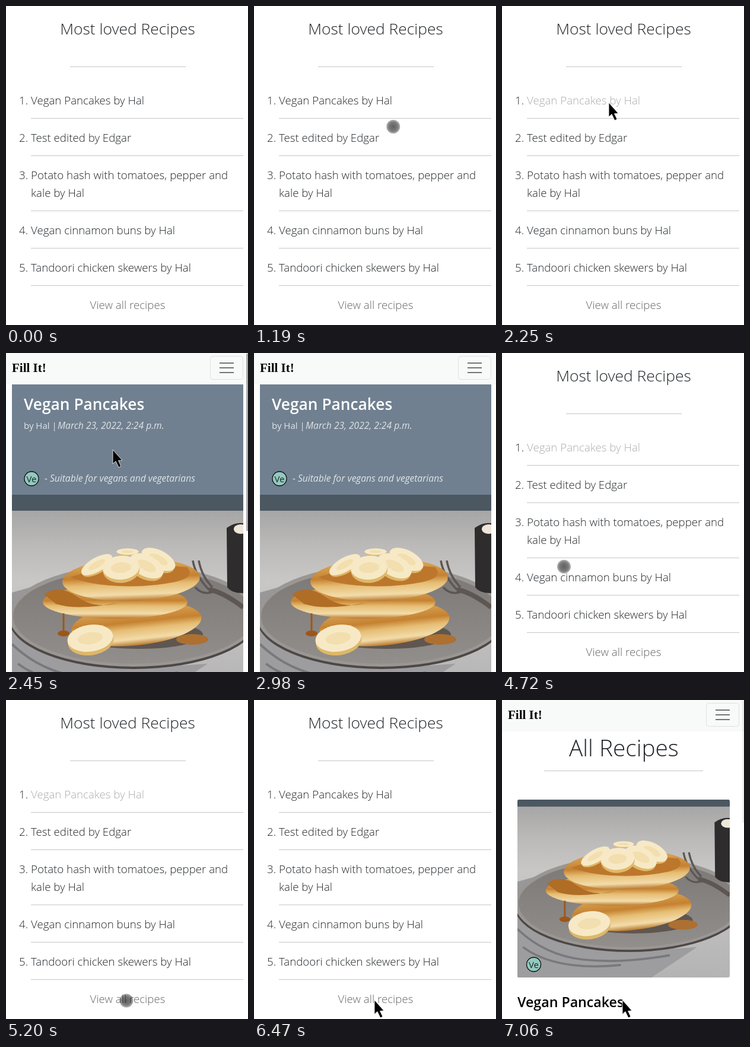
Recreate the animation shown at these times as an HTML page. Size 408 by 538 pixels, loop 7920 ms.

```html
<!DOCTYPE html>
<html lang="en">
<head>
<meta charset="utf-8">
<title>Recipe list</title>
<style>
  html, body { margin: 0; height: 100%; overflow: hidden; background: #fff; }
  svg { display: block; width: 100vw; height: 100vh; }
  text { font: 300 18.7px "Open Sans", "Noto Sans", sans-serif; fill: #212529; }
  .mid { text-anchor: middle; }
  text.head { font-size: 26.4px; }
  text.title { font-size: 38.8px; }
  text.name { font-size: 26.3px; font-weight: 600; fill: #fff; }
  text.card { font-size: 23.2px; font-weight: 600; fill: #000; }
  text.small { font-size: 15px; font-weight: 400; }
  text.pale { fill: #e0e3e6; }
  text.italic { font-size: 15.65px; font-style: italic; }
  text.brand { font: bold 21px "Liberation Serif", serif; fill: #000; }
  .rule { stroke: #c6c6c6; fill: none; }
</style>
</head>
<body>
<svg viewBox="0 0 408 538">
  <defs>
    <linearGradient id="table" x2="0" y2="1">
      <stop offset=".08" stop-color="#a7a6a6"/>
      <stop offset=".25" stop-color="#bbbab9"/>
      <stop offset=".42" stop-color="#c9c7c6"/>
      <stop offset="1" stop-color="#b4b3b4"/>
    </linearGradient>
    <linearGradient id="plate" x2="0" y2="1">
      <stop offset="0" stop-color="#7c7876"/>
      <stop offset="1" stop-color="#928e8b"/>
    </linearGradient>
    <linearGradient id="cake" x2="0" y2="1">
      <stop offset="0" stop-color="#e0b062"/>
      <stop offset=".45" stop-color="#c58231"/>
      <stop offset=".62" stop-color="#e6bd74"/>
      <stop offset=".85" stop-color="#f2dcaa"/>
      <stop offset="1" stop-color="#b9772c"/>
    </linearGradient>
    <radialGradient id="touch">
      <stop offset="0" stop-opacity=".62"/>
      <stop offset=".65" stop-opacity=".52"/>
      <stop offset="1" stop-opacity=".3"/>
    </radialGradient>
    <clipPath id="cardClip"><rect x="26" y="168" width="358" height="300" rx="3"/></clipPath>
    <clipPath id="heroClip"><rect x="10" y="239" width="390" height="299"/></clipPath>

    <g id="slice">
      <ellipse rx="31" ry="19" cy="4" fill="#deb868"/>
      <ellipse rx="31" ry="18" fill="#f7e9c6"/>
      <ellipse rx="17" ry="8" fill="#f2deae"/>
    </g>

    <g id="photo">
      <rect width="390" height="345" fill="url(#table)"/>
      <rect width="390" height="27" fill="#4b5761"/>
      <path d="M0 165L60 148 40 345H0z" fill="#98979a"/>
      <path d="M0 215Q60 290 200 294L330 285 240 345H0z" fill="#9d9c9f"/>
      <path d="M0 252Q50 300 120 308T280 300M10 285Q70 330 190 318" fill="none" stroke="#79787d" stroke-width="4"/>
      <ellipse cx="205" cy="208" rx="211" ry="86" fill="#4d4846"/>
      <ellipse cx="205" cy="204" rx="210" ry="86" fill="#9a9693"/>
      <ellipse cx="205" cy="205" rx="203" ry="80" fill="url(#plate)"/>
      <path d="M362 56Q376 46 390 48V166Q370 166 363 156Z" fill="#2f2c2d"/>
      <ellipse cx="386" cy="58" rx="12" ry="8" fill="#eee6da"/>
      <g fill="none" stroke="#5d5652" stroke-width="3.5">
        <path d="M305 111Q309 136 332 160M315 111Q320 138 338 156M309 156Q322 171 342 163"/>
        <path d="M332 160Q356 164 390 190" stroke-width="8"/>
      </g>
      <ellipse cx="214" cy="236" rx="108" ry="24" fill="#5f5650"/>
      <ellipse cx="304" cy="244" rx="27" ry="9" fill="#ad7030"/>
      <ellipse cx="210" cy="218" rx="110" ry="36" transform="rotate(-6 210 218)" fill="url(#cake)"/>
      <ellipse cx="174" cy="181" rx="122" ry="28" fill="url(#cake)"/>
      <path d="M54 168Q80 150 110 172T180 182Q110 196 74 184z" fill="#b06d26"/>
      <ellipse cx="201" cy="143" rx="116" ry="36" transform="rotate(-2 201 143)" fill="url(#cake)"/>
      <path d="M98 139Q180 112 295 122 312 140 270 148T180 154 98 139z" fill="#bd772d"/>
      <path d="M87 200V230" stroke="#9c5719" stroke-width="3"/>
      <ellipse cx="87" cy="234" rx="10" ry="5" fill="#9c5719"/>
      <use href="#slice" transform="translate(195 96)scale(.6 .3)"/>
      <use href="#slice" transform="translate(143 118)rotate(-30)scale(.95 .65)"/>
      <use href="#slice" transform="translate(247 109)rotate(27)scale(1 .85)"/>
      <use href="#slice" transform="translate(227 120)rotate(27)"/>
      <use href="#slice" transform="translate(184 123)rotate(-5)scale(1 1.12)"/>
      <use href="#slice" transform="translate(132 242)rotate(-8)scale(1.25)"/>
    </g>

    <g id="navbar">
      <rect width="408" height="53" fill="#f8f9f9"/>
      <text class="brand" x="10" y="32">Fill It!</text>
      <rect x="344.5" y="5.5" width="55" height="39" rx="4" fill="none" stroke="#dfe0e0"/>
      <path d="M360 17h24M360 25h24M360 33h24" stroke="#737474" stroke-width="2"/>
    </g>

    <g id="badge">
      <circle r="12" fill="#92cabf" stroke="#111" stroke-width="1.3"/>
      <text class="small mid" y="5.5">Ve</text>
    </g>
  </defs>

  <g id="list">
    <text class="head mid" x="205" y="48">Most loved Recipes</text>
    <path class="rule" d="M108 102.5H303M42 189.5H400M42 252.5H400M42 345.5H400M42 408.5H400M42 471.5H400"/>
    <text x="22" y="166">1.</text><text id="first" x="42" y="166">Vegan Pancakes by Hal</text>
    <text x="22" y="229">2.</text><text x="42" y="229">Test edited by Edgar</text>
    <text x="22" y="292">3.</text><text x="42" y="292">Potato hash with tomatoes, pepper and</text>
    <text x="42" y="322">kale by Hal</text>
    <text x="22" y="385">4.</text><text x="42" y="385">Vegan cinnamon buns by Hal</text>
    <text x="22" y="448">5.</text><text x="42" y="448">Tandoori chicken skewers by Hal</text>
    <text class="mid" x="205" y="511" style="fill:#666">View all recipes</text>
  </g>

  <g id="recipe">
    <use href="#navbar"/>
    <rect x="10" y="53" width="390" height="186" fill="#708090"/>
    <text class="name" x="30" y="96">Vegan Pancakes</text>
    <text class="small pale" x="30" y="128">by Hal |</text>
    <text class="small pale italic" x="87" y="128">March 23, 2022, 2:24 p.m.</text>
    <use href="#badge" x="43" y="212"/>
    <text class="small pale italic" x="65" y="217">- Suitable for vegans and vegetarians</text>
    <g clip-path="url(#heroClip)"><use href="#photo" x="10" y="239"/></g>
  </g>

  <g id="all">
    <use href="#navbar"/>
    <text class="title mid" x="205.5" y="95">All Recipes</text>
    <path class="rule" d="M71 119.5H339"/>
    <g clip-path="url(#cardClip)"><use href="#photo" transform="translate(26 155)scale(.918)"/></g>
    <use href="#badge" x="53.5" y="446"/>
    <text class="card" x="26" y="518">Vegan Pancakes</text>
    <text class="small" x="26" y="548.5">by Hal</text>
  </g>

  <rect id="bar" x="405" y="1" width="3" fill="#777"/>
  <circle id="dot" r="11.5" fill="url(#touch)"/>
  <path id="arrow" d="M0 0V24L5 19.5 10 30 14 28 9.5 18.5 16 18Z" stroke="#fff" stroke-width=".8"/>
</svg>
<script>
const LOOP = 7920;
const el = id => document.getElementById(id);
const show = (id, on) => el(id).setAttribute("visibility", on ? "visible" : "hidden");
const moveTo = (id, [x, y]) => el(id).setAttribute("transform", `translate(${x} ${y})`);
const within = (t, a, b) => t >= a && t < b;

// Number of steps taken: 1 at time a, n at time b
const tick = (t, a, b, n) =>
  Math.max(0, Math.min(n, Math.floor((t - a) / (b - a) * (n - 1) + 1 + 1e-6)));

// Decelerating move along a quadratic curve, in n discrete steps
function glide(t, a, b, n, from, bend, to) {
  const rest = 1 - (tick(t, a, b, n) - 1) / (n - 1);
  const u = 1 - rest * rest, v = 1 - u;
  return from.map((p, i) => v * v * p + 2 * u * v * bend[i] + u * u * to[i]);
}

function draw(t) {
  const onRecipe = within(t, 2450, 3980), onAll = t >= 6530;
  show("list", !onRecipe && !onAll);
  show("recipe", onRecipe);
  show("all", onAll);

  const dim = tick(t, 1790, 1920, 2) / 2 - tick(t, 5730, 5860, 2) / 2;
  el("first").setAttribute("opacity", 1 - 0.62 * dim);

  show("dot", within(t, 860, 2250) || within(t, 4580, 6470));
  moveTo("dot", t < 4000
    ? glide(t, 860, 1520, 11, [396, 343], [290, 238], [180, 165])
    : glide(t, 4580, 5200, 10, [3, 259], [150, 390], [203, 507]));

  show("arrow", within(t, 2250, 2780) || t >= 6470);
  moveTo("arrow", t < 4000 ? [180, 163] : [203, 506]);

  show("bar", onRecipe || onAll);
  el("bar").setAttribute("height", onAll ? 206 : 299);
  el("bar").setAttribute("opacity", onAll
    ? 0.6 - 0.24 * tick(t, 6930, 7060, 2)
    : 0.6 * (1 - tick(t, 2780, 2980, 4) / 4));
}

function frame() {
  draw(performance.now() % LOOP);
  requestAnimationFrame(frame);
}
frame();
</script>
</body>
</html>
```
